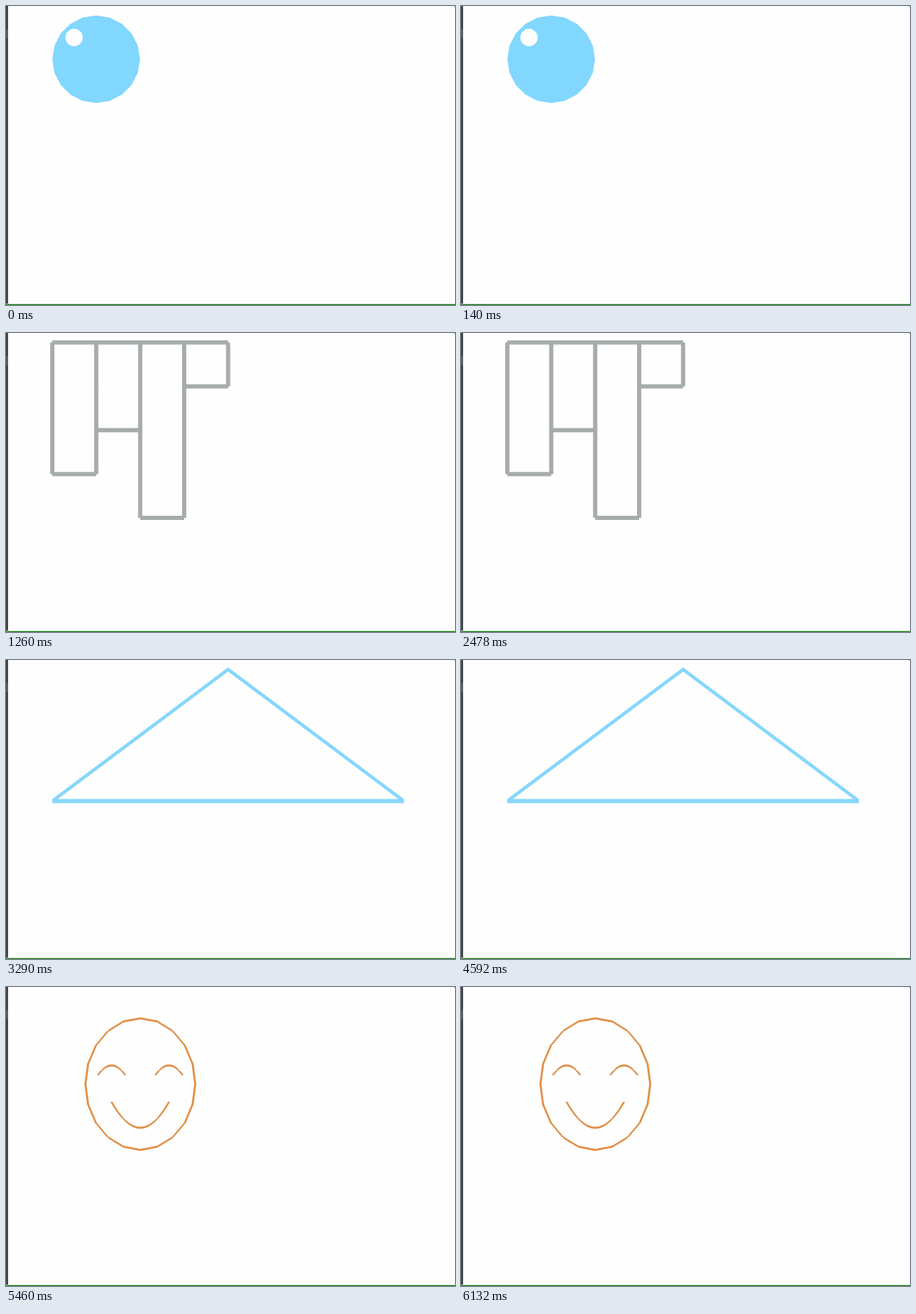
An HTML page with a canvas for the animation above (6580 ms loop, 640 by 427 pixels).

```html
<!DOCTYPE html>
<html lang="en">
<head>
<meta charset="utf-8">
<title>Line drawings</title>
<style>
  html, body { margin: 0; width: 100%; height: 100%; overflow: hidden; background: #fefefe; }
  canvas { display: block; }
</style>
</head>
<body>
<canvas id="stage" width="640" height="427"></canvas>
<script>
const ctx = document.getElementById('stage').getContext('2d');
const LOOP = 6580;
const UNIT = 62.65;
const PAPER = '#fefefe';

// Grid units to stage pixels
const at = (col, row) => [66 + (col - 1) * UNIT, 13.5 + row * UNIT];

function ring(cx, cy, rx, ry) {
  return Array.from({ length: 21 }, (_, i) => {
    const a = i * Math.PI / 10;
    return [cx + rx * Math.cos(a), cy + ry * Math.sin(a)];
  });
}

function parabola(cx, top, half, rise, steps = 20) {
  return Array.from({ length: steps + 1 }, (_, i) => {
    const u = i / steps * 2 - 1;
    return [cx + u * half, top + rise * u * u];
  });
}

function addPolygon(points) {
  points.forEach(([x, y], i) => i ? ctx.lineTo(x, y) : ctx.moveTo(x, y));
  ctx.closePath();
}

function fillPolygon(points, color) {
  ctx.fillStyle = color;
  ctx.beginPath();
  addPolygon(points);
  ctx.fill();
}

// Line ends are cut along the minor axis, as in raster wide lines
function addSegment(a, b, width) {
  const h = width / 2;
  const flat = Math.abs(b[0] - a[0]) >= Math.abs(b[1] - a[1]);
  const axis = flat ? 0 : 1;
  if (a[axis] > b[axis]) [a, b] = [b, a];
  const [dx, dy] = flat ? [0, -h] : [h, 0];
  addPolygon([
    [a[0] + dx, a[1] + dy], [b[0] + dx, b[1] + dy],
    [b[0] - dx, b[1] - dy], [a[0] - dx, a[1] - dy]
  ]);
}

function drawLines(paths, width, color) {
  ctx.fillStyle = color;
  ctx.beginPath();
  for (const path of paths) {
    for (let i = 1; i < path.length; i++) addSegment(path[i - 1], path[i], width);
  }
  ctx.fill();
}

function ball() {
  fillPolygon(ring(128.5, 76, 62.5, 62.5), '#82d7ff');
  fillPolygon(ring(97, 45, 12.5, 12.5), PAPER);
}

function bars() {
  const boxes = [3, 2, 4, 1].map((depth, i) => {
    const x = i + 1;
    return [at(x, 0), at(x + 1, 0), at(x + 1, depth), at(x, depth), at(x, 0)];
  });
  drawLines(boxes, 6, '#a6acab');
}

function triangle() {
  const left = at(1, 3), right = at(9, 3);
  drawLines([[left, at(5, 0), right, left]], 6, '#87d7fb');
}

function face() {
  drawLines([
    ring(191.5, 138.7, 78.3, 94),
    parabola(150.5, 112, 19.5, 14),
    parabola(232.3, 112, 19.5, 14),
    parabola(191.4, 201, 41, -37)
  ], 3, '#e0914b');
}

const scenes = [[5460, face], [3290, triangle], [1260, bars], [0, ball]];

function rect(x, y, w, h, color) {
  ctx.fillStyle = color;
  ctx.fillRect(x, y, w, h);
}

function backdrop() {
  rect(0, 0, 640, 427, PAPER);
  rect(0, 0, 3, 427, '#454545');
  rect(0, 33, 3, 13, '#5c5c5c');
  rect(639, 0, 1, 1, '#777');
  rect(0, 425, 640, 1, '#b5d9b0');
  rect(0, 426, 640, 1, '#0b750b');
}

let current = null;
const start = performance.now();

function tick() {
  const t = (performance.now() - start) % LOOP;
  const scene = scenes.find(([from]) => t >= from)[1];
  if (scene !== current) {
    current = scene;
    backdrop();
    scene();
  }
  requestAnimationFrame(tick);
}
tick();
</script>
</body>
</html>
```
